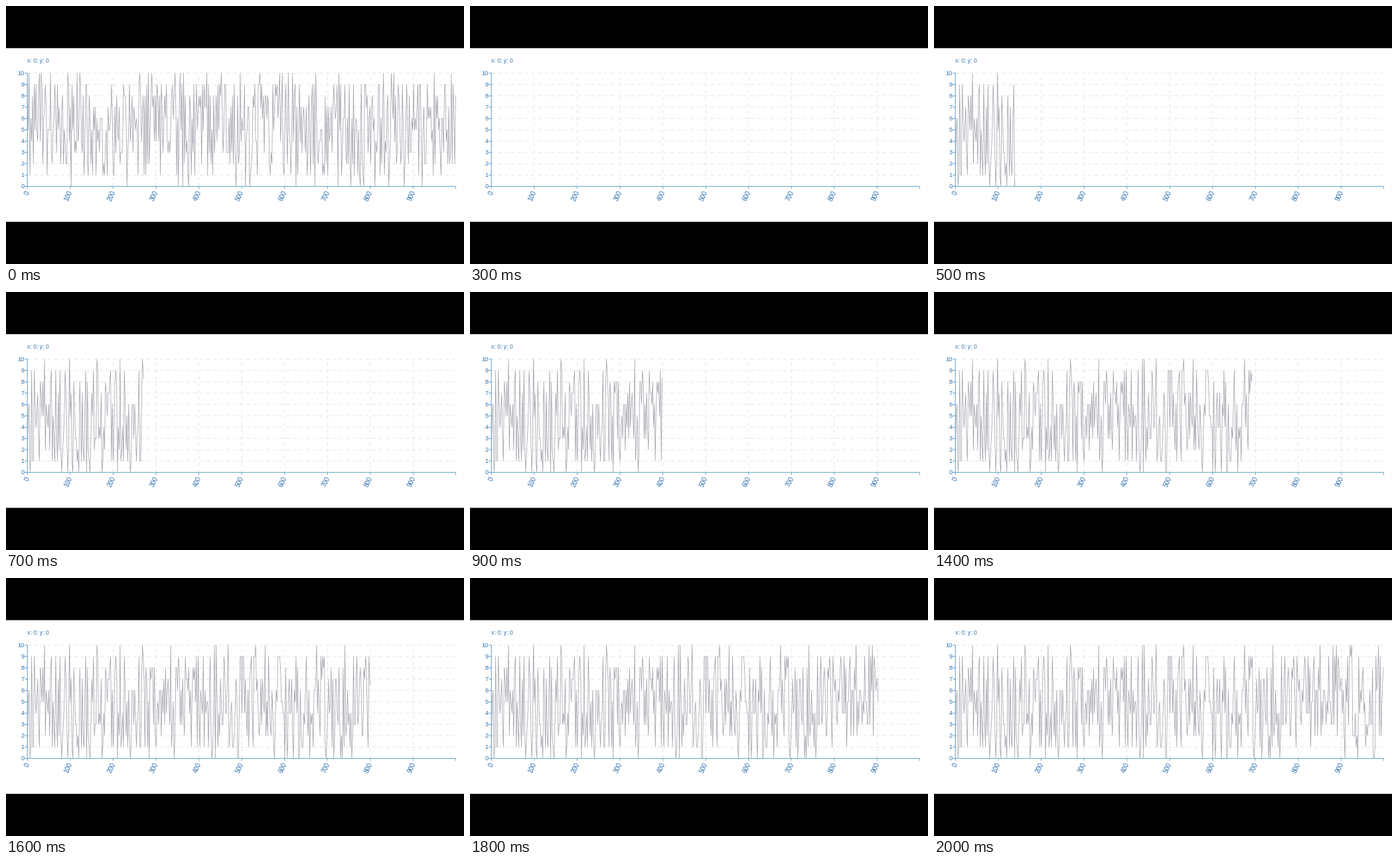
These frames come from a looping animation (690 by 388 pixels, 2400 ms). A matplotlib script:

```python
import numpy as np
import matplotlib.pyplot as plt
from matplotlib.animation import FuncAnimation
from matplotlib.patches import Rectangle

W, H, DPI = 690, 388, 100
LEFT, RIGHT, TOP, BASE = 32.2, 677.4, 101.0, 271.3
POINTS = 500
FRAMES, STEP_MS = 24, 100
WIPE_START, WIPE_END = 300, 2000
PT = 72 / DPI

TEXT = "#3273b4"
AXIS_X, AXIS_Y = "#5fa6c0", "#5a9bd0"
GRID, TRACE = "#e5e5e8", "#9a9ca4"

plt.rcParams["font.family"] = "Liberation Sans"

fig = plt.figure(figsize=(W / DPI, H / DPI), dpi=DPI, facecolor="black")
ax = fig.add_axes([0, 0, 1, 1])
ax.set_xlim(0, W)
ax.set_ylim(H, 0)
ax.axis("off")
ax.add_patch(Rectangle((0, 63.4), W, 261.2, fc="white", lw=0, snap=False))

xs = np.linspace(LEFT, RIGHT, POINTS)


def x_px(value):
    return LEFT + (RIGHT - LEFT) * value / 999


def y_px(value):
    return BASE - (BASE - TOP) * value / 10


def stroke(x, y, color, lw=1, **kw):
    return ax.plot(x, y, color=color, lw=lw * PT, snap=False,
                   solid_capstyle="butt", **kw)[0]


def label(x, y, text, size, **kw):
    ax.text(x, y, text, color=TEXT, size=size * PT, **kw)


def noise(seed):
    """Whole values from 0 to 10; both ends come up half as often."""
    return y_px(np.rint(np.random.default_rng(seed).random(POINTS) * 10))


before, after = noise(4), noise(11)

for k in range(11):
    y = y_px(k)
    if k:
        stroke([LEFT, RIGHT], [y, y], GRID, dashes=(5, 5), zorder=1)
    stroke([LEFT - 4, LEFT], [y, y], AXIS_Y, zorder=3)
    label(27.6, y + 2.9, str(k), 9.2, ha="right")

for k in range(0, 1000, 100):
    x = x_px(k)
    if k:
        stroke([x, x], [BASE, TOP], GRID, dashes=(5, 5), zorder=1)
    stroke([x, x], [BASE, BASE + 3.5], AXIS_X, zorder=3)
    label(x + 0.9, 278.5, str(k), 9.6, rotation=65,
          rotation_mode="anchor", ha="right", va="center")

stroke([LEFT, RIGHT, RIGHT], [BASE, BASE, BASE + 3.5], AXIS_X, zorder=3)
stroke([LEFT, LEFT], [TOP, BASE], AXIS_Y, zorder=3)
label(32, 85.1, "x: 0; y: 0", 8.6)

trace = stroke([], [], TRACE, lw=0.7, zorder=2, solid_joinstyle="round")


def draw(i):
    t = i * STEP_MS
    if t < WIPE_START:
        trace.set_data(xs, before)
        return trace,
    s = min((t - WIPE_START) / (WIPE_END - WIPE_START), 1)
    # the wipe slows down slightly towards the right edge
    end = LEFT + (RIGHT - LEFT) * s * (1.2 - 0.2 * s)
    n = np.searchsorted(xs, end)
    trace.set_data(np.append(xs[:n], end),
                   np.append(after[:n], np.interp(end, xs, after)))
    return trace,


anim = FuncAnimation(fig, draw, frames=FRAMES, interval=STEP_MS,
                     repeat=True, repeat_delay=0, blit=False)
plt.show()
```
